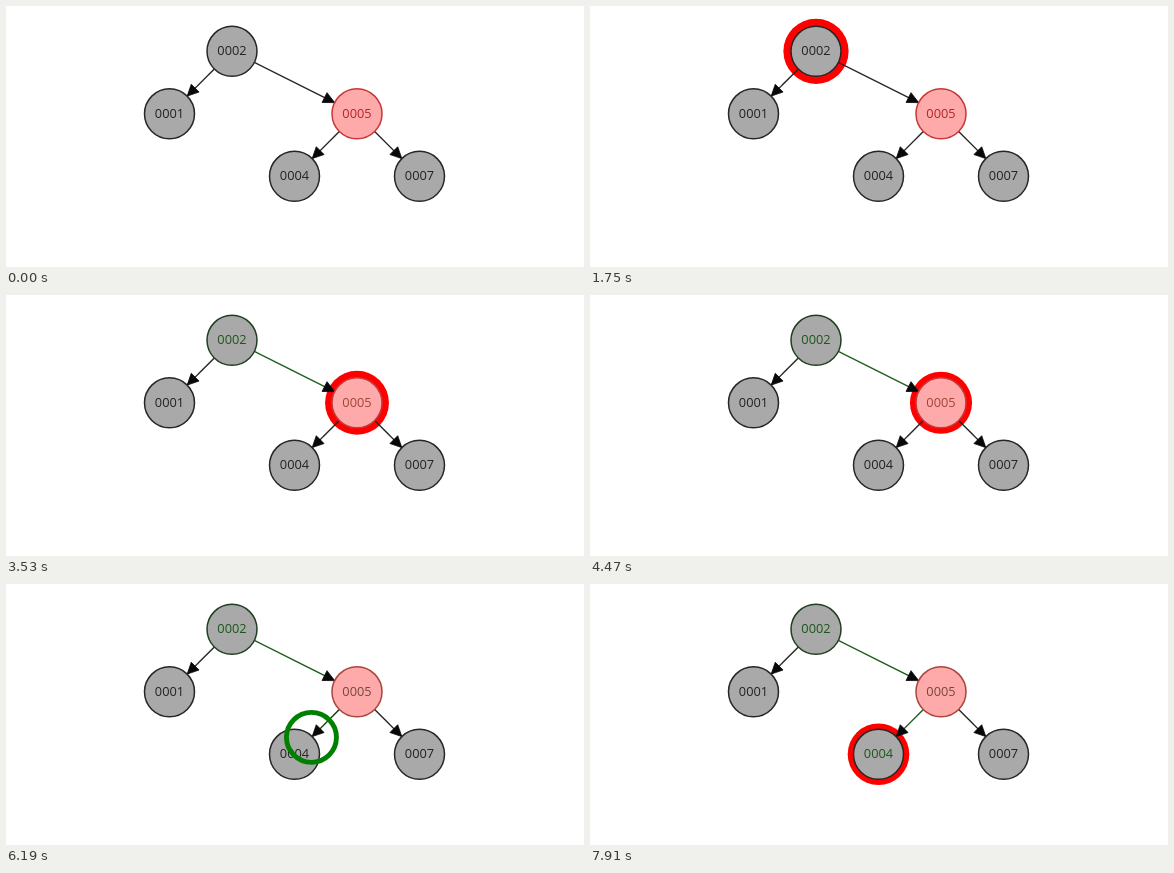
Recreate the animation shown at these times as an HTML page. Size 578 px wide and 261 px high, loop 7990 ms.

```html
<!DOCTYPE html>
<html lang="en">
<head>
<meta charset="utf-8">
<title>Tree search</title>
<style>
html, body { margin: 0; width: 100%; height: 100%; overflow: hidden; background: #fff; }
svg { display: block; width: 578px; height: 261px; }
text { font: 12.8px "Open Sans", "Noto Sans", sans-serif; text-anchor: middle; }
</style>
</head>
<body>
<svg id="stage" viewBox="0 0 578 261"></svg>
<script>
const LOOP = 7990, R = 25;
const GREY = '#a9a9a9', PINK = '#ffaaaa', INK = '#262626', GREEN = '#1a5c1a';

const nodes = {
  '0002': { x: 226, y: 45.3 },
  '0001': { x: 163.5, y: 107.8 },
  '0005': { x: 351, y: 107.8, pink: true },
  '0004': { x: 288.5, y: 170.3 },
  '0007': { x: 413.5, y: 170.3 }
};
const links = [['0002', '0001'], ['0002', '0005'], ['0005', '0004'], ['0005', '0007']];

// highlighted node: from, to (ms)
const pulses = [['0002', 525, 2075], ['0005', 3510, 5140], ['0004', 6575, LOOP]];
// travelling circle: from node, to node, start, end (ms)
const moves = [['0002', '0005', 2075, 3510], ['0005', '0004', 5140, 6575]];
// bursts of screen updates: first, last, count
const bursts = [
  [530, 1300, 11], [1370, 2140, 11], [2210, 3000, 11], [3070, 3840, 11],
  [3940, 4700, 11], [4770, 5560, 11], [5640, 6420, 11], [6510, 6650, 3],
  [6800, 7520, 10], [7670, 7910, 4]
];

const stage = document.getElementById('stage');
function add(tag, attrs) {
  const el = document.createElementNS('http://www.w3.org/2000/svg', tag);
  set(el, attrs);
  return stage.appendChild(el);
}
function set(el, attrs) {
  for (const k in attrs) el.setAttribute(k, attrs[k]);
}

const halo = add('circle', { fill: '#f00' });

const lines = {};
for (const [a, b] of links) {
  const p = nodes[a], q = nodes[b];
  const d = Math.hypot(q.x - p.x, q.y - p.y);
  const ux = (q.x - p.x) / d, uy = (q.y - p.y) / d;
  const tx = q.x - ux * R, ty = q.y - uy * R;
  const bx = tx - ux * 11.3, by = ty - uy * 11.3;
  lines[a + b] = add('line', {
    x1: p.x + ux * R, y1: p.y + uy * R, x2: tx, y2: ty, 'stroke-width': 1.4
  });
  add('path', {
    d: `M${tx} ${ty}L${bx - uy * 5.5} ${by + ux * 5.5}L${bx + uy * 5.5} ${by - ux * 5.5}Z`,
    fill: '#080808', stroke: '#080808', 'stroke-width': 0.8
  });
}

for (const name in nodes) {
  const n = nodes[name];
  n.disc = add('circle', {
    cx: n.x, cy: n.y, r: R, fill: n.pink ? PINK : GREY, 'stroke-width': 1.5
  });
  n.label = add('text', { x: n.x, y: n.y + 3.9 });
  n.label.textContent = name;
}

const rover = add('circle', { r: 25, fill: 'none', stroke: '#008000', 'stroke-width': 4.9 });

function hold(t) {
  let out = 0;
  for (const [first, last, count] of bursts) {
    if (t < first) break;
    const gap = (last - first) / (count - 1);
    out = first + Math.min(count - 1, Math.floor((t - first) / gap + 0.02)) * gap;
  }
  return out;
}

// triangle wave between 3.8 and 8.8 px, widest at 6690 ms
function swell(t) {
  const phase = (((t - 6690) / 1740) % 1 + 1) % 1;
  return 3.8 + 5 * Math.abs(1 - 2 * phase);
}

function paint(now) {
  const t = hold(now);

  const pulse = pulses.find(p => t >= p[1] && t < p[2]);
  halo.style.display = pulse ? '' : 'none';
  if (pulse) {
    const n = nodes[pulse[0]];
    set(halo, { cx: n.x, cy: n.y, r: R + swell(t) });
  }

  const move = moves.find(m => t >= m[2] && t < m[3]);
  rover.style.display = move ? '' : 'none';
  if (move) {
    const p = nodes[move[0]], q = nodes[move[1]];
    const k = (t - move[2]) / (move[3] - move[2]);
    set(rover, { cx: p.x + (q.x - p.x) * k, cy: p.y + (q.y - p.y) * k });
  }

  const left = t >= 2075, reached = t >= 3200, down = t >= 5140, done = t >= 6400;
  for (const name in nodes) {
    set(nodes[name].disc, { stroke: INK });
    set(nodes[name].label, { fill: '#222' });
  }
  set(nodes['0002'].disc, { stroke: left ? '#1f401f' : INK });
  set(nodes['0002'].label, { fill: left ? '#1c551c' : '#222' });
  set(nodes['0005'].disc, { stroke: down ? '#a8453c' : '#c8383a' });
  set(nodes['0005'].label, { fill: down ? '#74483a' : reached ? '#a04438' : '#b0252a' });
  set(nodes['0004'].label, { fill: done ? '#1c551c' : '#222' });

  for (const id in lines) set(lines[id], { stroke: INK });
  if (left) set(lines['00020005'], { stroke: GREEN });
  if (down) set(lines['00050004'], { stroke: done ? GREEN : '#0a3a0a' });
}

const begin = performance.now();
function frame() {
  paint((performance.now() - begin) % LOOP);
  requestAnimationFrame(frame);
}
paint(0);
requestAnimationFrame(frame);
</script>
</body>
</html>
```
